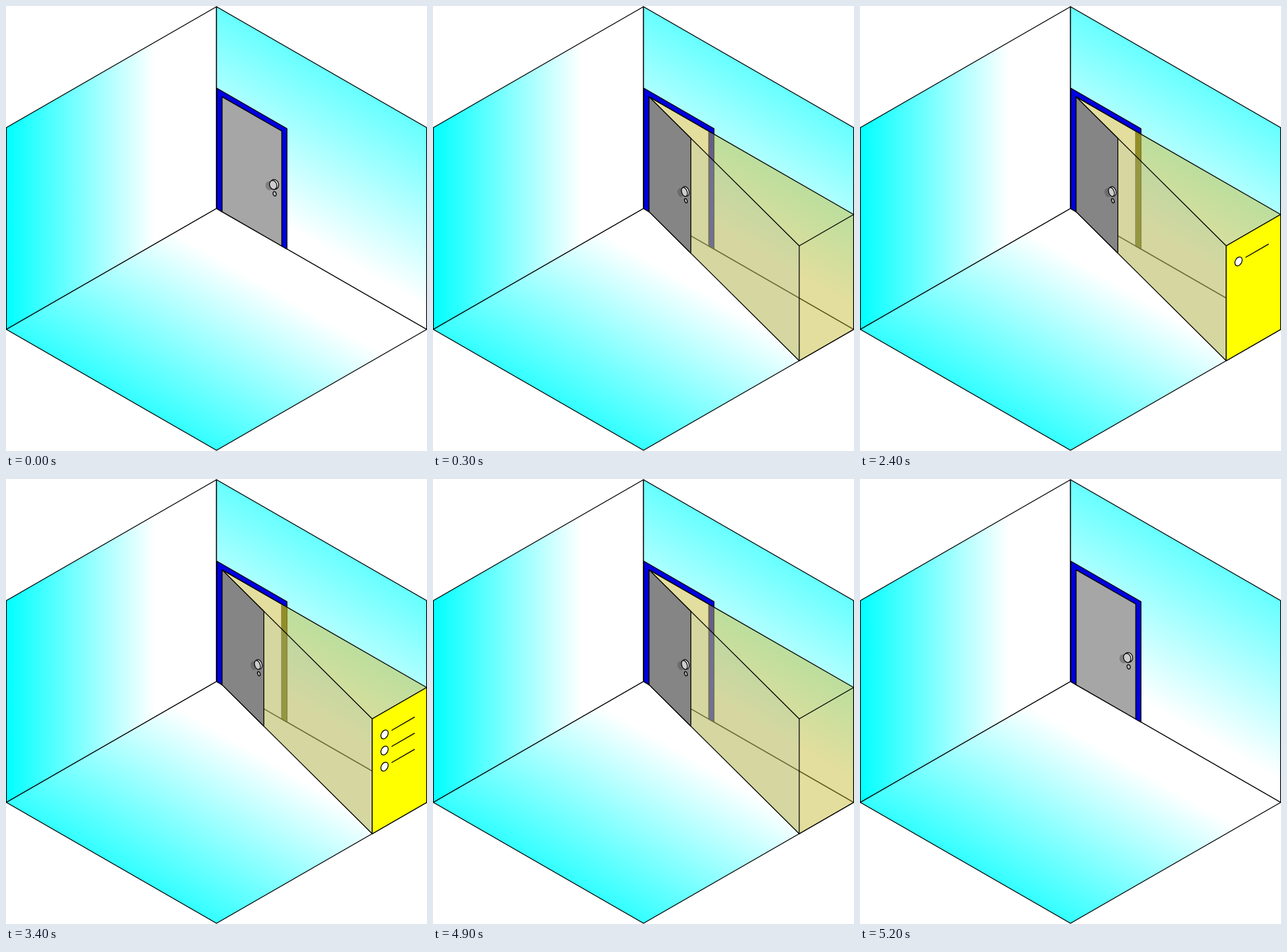
Write an HTML page with a canvas that moves like this. It is 600 px wide and 635 px high and loops after 7.2 s.

```html
<!DOCTYPE html>
<html lang="en">
<head>
<meta charset="utf-8">
<title>Magic door</title>
<style>
  html, body { margin: 0; width: 100%; height: 100%; overflow: hidden; background: #fff; }
  canvas { display: block; }
</style>
</head>
<body>
<canvas id="stage" width="600" height="635"></canvas>
<script>
const ctx = document.getElementById('stage').getContext('2d');
const LOOP = 7200;
const SLOPE = .577;
const DOOR = 164;
const GLASS = 'rgba(200,190,60,.5)';
const SHADE = 'rgba(160,185,170,.2)';

// Isometric points at a height above the back wall's foot and the right floor edge.
const wall = (x, height) => [x, 289 + (x - 300) * SLOPE - height];
const side = (x, height) => [x, 461.5 + (599.5 - x) * SLOPE - height];
const mix = (a, b, k) => a.map((v, i) => v + (b[i] - v) * k);

function gradient(x0, y0, x1, y1, color) {
  const g = ctx.createLinearGradient(x0, y0, x1, y1);
  g.addColorStop(0, color);
  g.addColorStop(1, '#fff');
  return g;
}

const leftPaint = gradient(0, 0, 212, 0, '#0ff');
const floorPaint = gradient(150, 548, 270, 341, '#3ff');
const wallPaint = gradient(450, 87, 339, 279, '#6ff');

function paint(fill, stroke) {
  if (fill) { ctx.fillStyle = fill; ctx.fill(); }
  if (stroke) { ctx.strokeStyle = stroke; ctx.lineWidth = 1.2; ctx.stroke(); }
}

function trace(points) {
  ctx.beginPath();
  points.forEach(point => ctx.lineTo(...point));
}

function poly(points, fill, stroke) {
  trace(points);
  ctx.closePath();
  paint(fill, stroke);
}

function line(...points) {
  trace(points);
  paint(null, '#000');
}

function oval([x, y], rx, ry, tilt, fill, stroke) {
  ctx.beginPath();
  ctx.ellipse(x, y, rx, ry, tilt, 0, Math.PI * 2);
  paint(fill, stroke);
}

function drawRoom() {
  const center = [300, 289], left = [.5, 461.5], right = [599.5, 461.5];
  poly([[.5, 173.5], [300, 1], center, left], leftPaint, '#000');
  poly([[300, 1], [599.5, 173.5], right, center], wallPaint, '#000');
  poly([left, center, right, [300, 634]], floorPaint, '#000');
}

function drawFrame() {
  const opening = [wall(393, 0), wall(393, DOOR), wall(308, DOOR), wall(308, 0)];
  poly(opening, '#fff');
  poly([wall(300.5, 0), wall(300.5, 172), wall(400.5, 172), wall(400.5, 0), ...opening], '#0000e0', '#000');
}

function drawBeam(x, solid) {
  const top = side(x, DOOR), foot = side(x, 0);
  const farTop = side(599.5, DOOR), farFoot = side(599.5, 0);
  const hingeTop = wall(308, DOOR), hingeFoot = wall(308, 0);
  if (solid) poly([wall(393, DOOR), wall(400.5, DOOR), wall(400.5, 0), wall(393, 0)], '#5c5c10');
  line(hingeFoot, farFoot);
  poly([hingeTop, farTop, farFoot, foot, hingeFoot], GLASS);
  poly([hingeTop, top, foot, hingeFoot], SHADE);
  line(hingeTop, farTop, top);
  line(hingeTop, top, foot);
  line(hingeFoot, foot, farFoot, farTop);
}

function drawDoor(x, step) {
  // The door's free edge lies on the beam's front face.
  const edge = 393 - 8.5 * step;
  const reach = (edge - 308) / (x - 308);
  const corner = height => mix(wall(308, height), side(x, height), reach);
  const gray = 166 - 11 * step;
  poly([wall(308, 0), wall(308, DOOR), corner(DOOR), corner(0)], `rgb(${gray},${gray},${gray})`, '#000');

  const kx = edge - 11.5 + step, ky = 255 + 3.3 * step, rx = 5.6 - .4 * step;
  oval([kx - 6, ky + 1.5], rx, 6.5, -.3, 'rgba(70,70,70,.4)');
  oval([kx + 1.3, ky - .5], rx, 7, -.35, '#fff', '#000');
  oval([kx - .7, ky + .4], rx - .5, 6.6, -.35, '#ccc', '#000');
  oval([kx + 1.4, ky + 13], rx * .42, 3.2, -.3, '#b8b8b8', '#000');
}

function drawPanel(x, time) {
  const rect = (x0, x1, low, high) => [side(x0, low), side(x0, high), side(x1, high), side(x1, low)];
  const button = (bx, height) => oval(side(bx, height), 4.6, 6.8, .5, '#fff', '#000');
  poly(rect(x, 599.5, 0, DOOR), '#ff0', '#000');
  if (time < 2400) {
    poly(rect(532, 590.5, 22.5, 151.5), '#fff', '#000');
    line([552.5, 352], [539.5, 392]);
    line([568, 344], [539.5, 425]);
    button(561, 11.5);
    return;
  }
  const rows = Math.floor((time - 1900) / 500);
  for (let i = 0; i < rows; i++) {
    const height = 131.7 - i * 23;
    button(539.5, height);
    line(side(549.5, height), side(582.5, height));
  }
}

function draw(time) {
  const tick = Math.floor(time / 100);
  const step = Math.max(0, Math.min(3, tick, 52 - tick));
  const x = 599.5 - 24.5 * step - .45 * step * step;
  const panel = time >= 400 && time < 4900;
  ctx.clearRect(0, 0, 600, 635);
  drawRoom();
  drawFrame();
  if (step) drawBeam(x, panel);
  drawDoor(x, step);
  if (panel) drawPanel(x, time);
}

ctx.lineJoin = 'round';
const start = performance.now();
function frame() {
  draw((performance.now() - start) % LOOP);
  requestAnimationFrame(frame);
}
frame();
</script>
</body>
</html>
```
